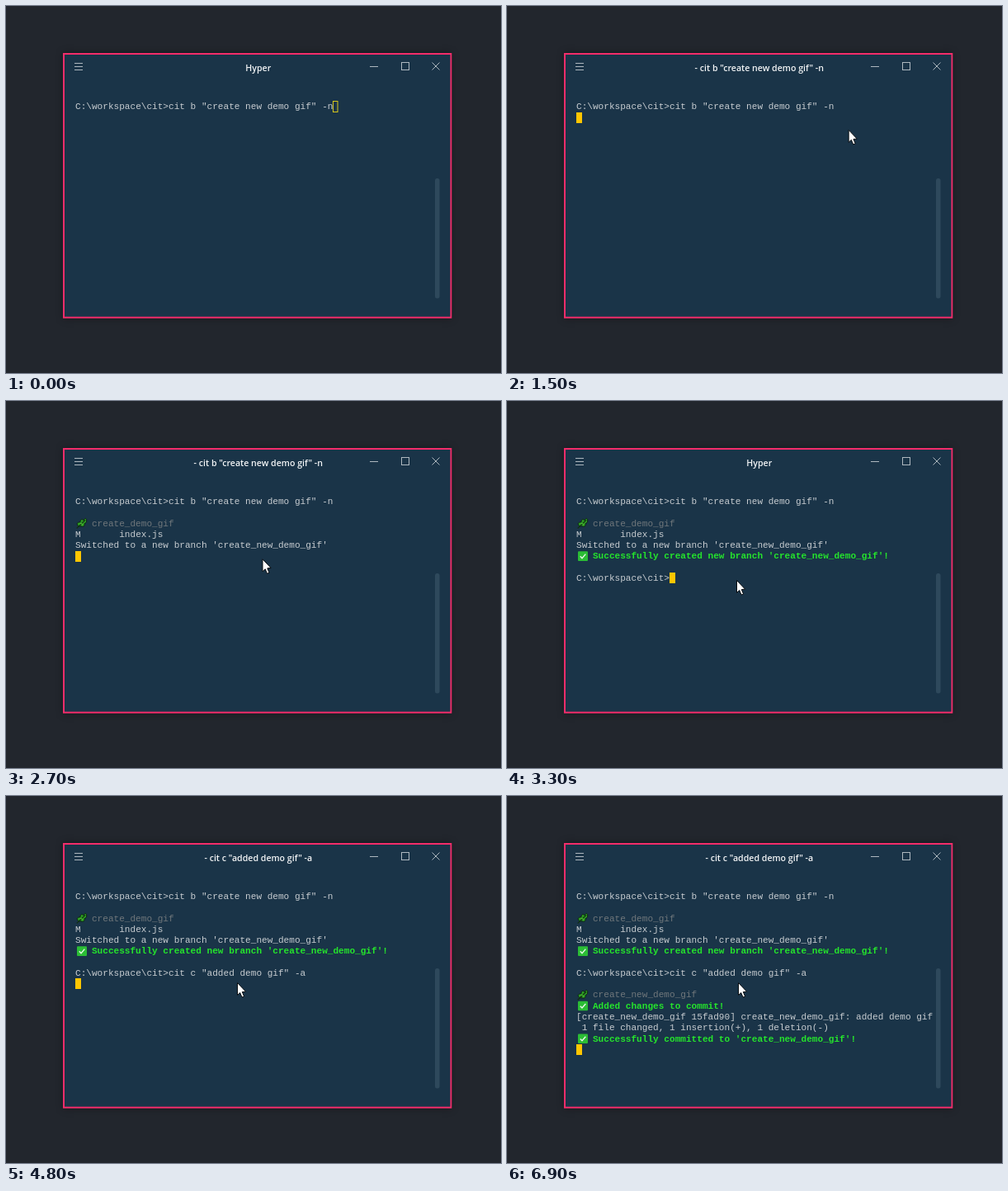
Animation, 600 px wide and 445 px high, one loop 7000 ms. Source, as an HTML page with a canvas:

```html
<!DOCTYPE html>
<html>
<head>
<meta charset="utf-8">
<style>
  html, body { margin: 0; width: 100%; height: 100%; overflow: hidden; background: #22262d; }
  canvas { display: block; }
</style>
</head>
<body>
<canvas id="stage" width="600" height="445"></canvas>
<script>
const ctx = document.getElementById('stage').getContext('2d');
const LOOP = 7000, STEP = 100;
const LEFT = 84, TOP = 115.3, CELL_W = 6.647, CELL_H = 13.27;
const PLAIN = '#c8cdd1', DIM = '#70777b', GREEN = '#25e52c', YELLOW = '#ffc600';

// Terminal output: start time, row, text, style
const lines = [
  [0, 0, 'C:\\workspace\\cit>cit b "create new demo gif" -n'],
  [1700, 2, 'create_demo_gif', 'leaf'],
  [2500, 3, 'M       index.js'],
  [2500, 4, "Switched to a new branch 'create_new_demo_gif'"],
  [2900, 5, "Successfully created new branch 'create_new_demo_gif'!", 'check'],
  [3100, 7, 'C:\\workspace\\cit>'],
  [3600, 7, '                 cit c "added demo gif" -a'],
  [5300, 9, 'create_new_demo_gif', 'leaf'],
  [5900, 10, 'Added changes to commit!', 'check'],
  [6900, 11, '[create_new_demo_gif 15fad90] create_new_demo_gif: added demo gif'],
  [6900, 12, ' 1 file changed, 1 insertion(+), 1 deletion(-)'],
  [6900, 13, "Successfully committed to 'create_new_demo_gif'!", 'check'],
];

// Caret: time, column, row
const carets = [
  [0, 47, 0], [700, 0, 1], [1700, 0, 3], [2500, 0, 5], [2900, 0, 6], [3100, 17, 7],
  [3600, 42, 7], [4100, 0, 8], [5300, 0, 10], [5900, 0, 11], [6900, 0, 14],
];

const titles = [
  [0, 'Hyper'], [700, '- cit b "create new demo gif" -n'],
  [3100, 'Hyper'], [4100, '- cit c "added demo gif" -a'],
];

// Pointer: time, x, y
const pointer = [
  [100, 505, 356], [400, 455, 230], [800, 425.5, 141], [1300, 425.5, 141],
  [2000, 384, 172], [2800, 300, 194], [3300, 278, 217], [3500, 278, 217], [3800, 280, 226],
];

const latest = (list, t) => list.filter(item => item[0] <= t).pop();

function trace(points, close) {
  ctx.beginPath();
  points.forEach(([x, y]) => ctx.lineTo(x, y));
  if (close) ctx.closePath();
}

function stroke(points, color, width = 1) {
  trace(points);
  ctx.strokeStyle = color;
  ctx.lineWidth = width;
  ctx.stroke();
}

function pill(x, y, w, h, r, color) {
  ctx.beginPath();
  ctx.roundRect(x, y, w, h, r);
  ctx.fillStyle = color;
  ctx.fill();
}

function drawWindow(title) {
  ctx.fillStyle = '#22262d';
  ctx.fillRect(0, 0, 600, 445);
  ctx.shadowColor = 'rgba(0,0,0,.35)';
  ctx.shadowBlur = 9;
  ctx.fillStyle = '#f42d6b';
  ctx.fillRect(69, 57, 471.3, 321.7);
  ctx.shadowBlur = 0;
  ctx.fillStyle = '#1a3448';
  ctx.fillRect(71, 59, 467.5, 317.7);

  const icon = '#aeb8bf';
  for (const y of [69.5, 73.5, 77.5]) stroke([[83, y], [93, y]], icon);
  stroke([[441, 73.5], [451, 73.5]], icon);
  ctx.strokeRect(479.5, 68.5, 9, 9);
  stroke([[516.5, 68.5], [525.5, 77.5]], icon);
  stroke([[525.5, 68.5], [516.5, 77.5]], icon);
  pill(520, 209, 5.5, 145.5, 2.5, '#2e495c');

  ctx.font = '600 10.6px "Open Sans", sans-serif';
  ctx.textAlign = 'center';
  ctx.fillStyle = '#f3f5f6';
  ctx.fillText(title, 305.8, 78.7);
  ctx.textAlign = 'left';
}

function drawCheck(y) {
  pill(86, y + 0.7, 12, 11.6, 1, '#2bbd35');
  stroke([[88.8, y + 6.7], [91, y + 9], [95.3, y + 4]], '#e9f7ea', 1.4);
}

function drawLeaf(y) {
  ctx.save();
  ctx.translate(85, y);
  ctx.beginPath();
  ctx.moveTo(3, 10);
  ctx.bezierCurveTo(-1, 6, 3, 5, 5, 5);
  ctx.bezierCurveTo(5, 1, 8, 1, 9, 3);
  ctx.bezierCurveTo(10, 0, 13, 0, 12.7, 3);
  ctx.bezierCurveTo(13, 6, 11, 6, 10, 7);
  ctx.bezierCurveTo(11, 10, 8, 11, 6, 10);
  ctx.closePath();
  ctx.fillStyle = '#2c9a24';
  ctx.fill();
  ctx.strokeStyle = '#0c2013';
  ctx.lineWidth = 1;
  ctx.stroke();
  stroke([[0.7, 12.5], [11, 2.5]], '#10300f', 1.2);
  stroke([[4, 7], [7, 6.5], [7.5, 9]], '#58c63c', 0.8);
  ctx.restore();
}

function drawLine([, row, text, style]) {
  const y = TOP + row * CELL_H;
  if (style === 'leaf') drawLeaf(y);
  if (style === 'check') drawCheck(y);
  ctx.font = (style === 'check' ? 'bold ' : '') + '11.08px "Liberation Mono", monospace';
  ctx.fillStyle = style === 'leaf' ? DIM : style === 'check' ? GREEN : PLAIN;
  ctx.fillText(text, LEFT + (style ? 3 * CELL_W : 0), y + 9.7);
}

function drawCaret([, col, row], focused) {
  const x = Math.round(LEFT + col * CELL_W), y = Math.round(TOP + row * CELL_H);
  if (focused) {
    ctx.fillStyle = YELLOW;
    ctx.fillRect(x, y, 7, 13);
  } else {
    ctx.strokeStyle = '#d8c81c';
    ctx.lineWidth = 1;
    ctx.strokeRect(x + 0.5, y + 0.5, 5.5, 13);
  }
}

function drawPointer(t) {
  const from = latest(pointer, t);
  if (!from) return;
  const to = pointer.find(p => p[0] > t) || from;
  const k = to === from ? 0 : (t - from[0]) / (to[0] - from[0]);
  ctx.save();
  ctx.translate(from[1] + (to[1] - from[1]) * k, from[2] + (to[2] - from[2]) * k);
  trace([[0.5, 0.5], [0.5, 15.5], [3.7, 12.5], [6, 18], [8.6, 17], [6.3, 11.6], [10.6, 11.2]], true);
  ctx.fillStyle = '#fff';
  ctx.fill();
  ctx.strokeStyle = '#080c10';
  ctx.lineWidth = 1;
  ctx.stroke();
  ctx.restore();
}

function draw(now) {
  const t = Math.floor(now % LOOP / STEP) * STEP;
  drawWindow(latest(titles, t)[1]);
  lines.filter(line => line[0] <= t).forEach(drawLine);
  drawCaret(latest(carets, t), t >= 500);
  drawPointer(t);
}

const start = performance.now();
function tick() {
  draw(performance.now() - start);
  requestAnimationFrame(tick);
}
tick();
</script>
</body>
</html>
```
